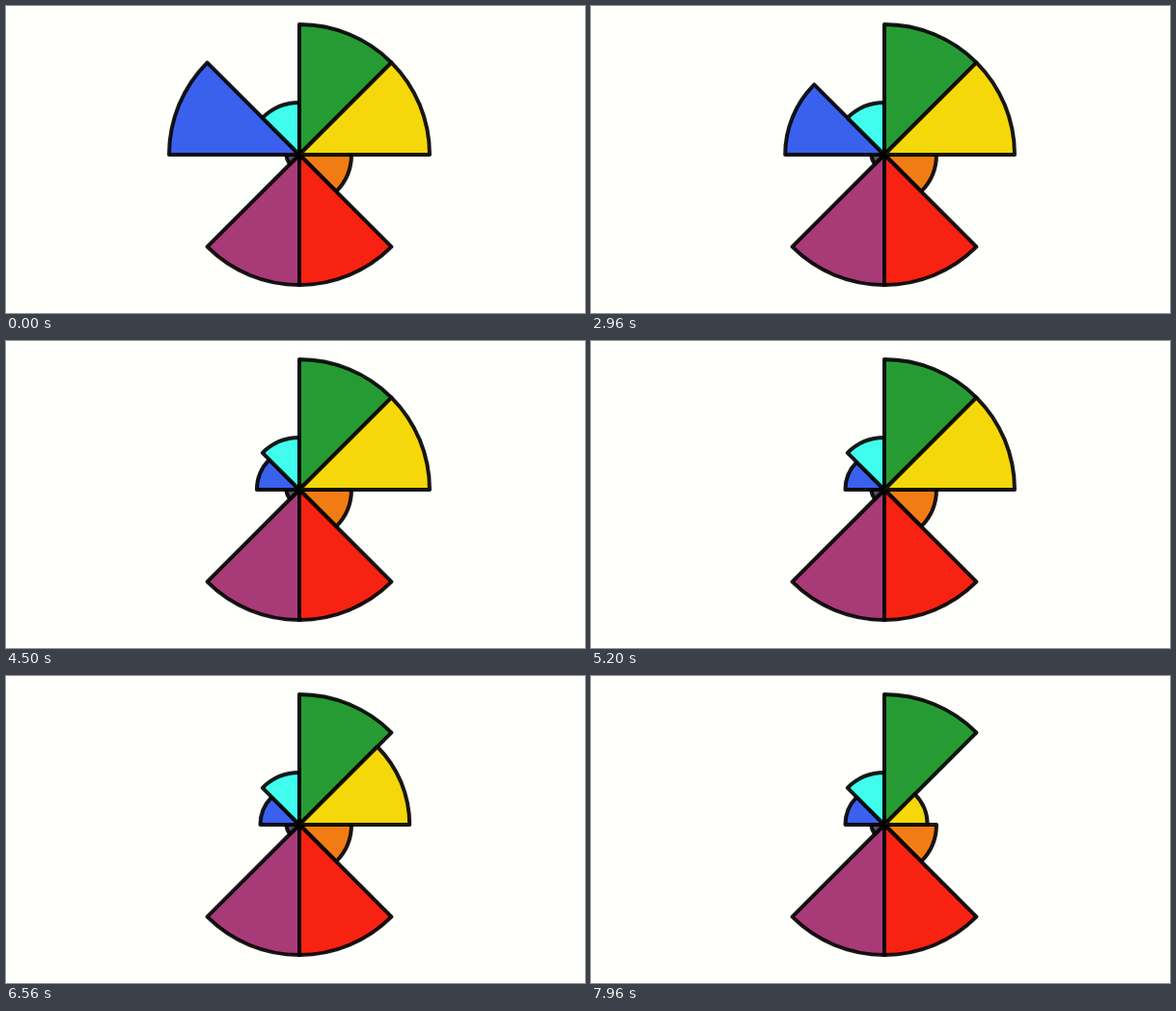
An HTML page with a canvas for the animation above (8 s loop, 600 px wide and 318 px high).

```html
<!DOCTYPE html>
<html lang="en">
<head>
<meta charset="utf-8">
<title>Wheel</title>
<style>
  html, body { margin: 0; width: 100%; height: 100%; overflow: hidden; background: #fffffc; }
  canvas { display: block; }
</style>
</head>
<body>
<canvas id="stage" width="600" height="318"></canvas>
<script>
const ctx = document.getElementById("stage").getContext("2d");
const LOOP = 8000;
const CX = 304, CY = 154, FULL = 135;

// Clockwise from three o'clock, one eighth of a turn each.
// Size is a share of the full radius; shrinking wedges start full.
const wedges = [
  { color: "#f27c14", size: 0.4 },
  { color: "#f82212", size: 1 },
  { color: "#a83a78", size: 1 },
  { color: "#5c5060", size: 0.1 },
  { color: "#3a60ee", size: 0.3, start: 2160, duration: 3300 },
  { color: "#40fdee", size: 0.4 },
  { color: "#269b34", size: 1 },
  { color: "#f4d80a", size: 0.3, start: 6080, duration: 2700 }
];

// Gentle start, long soft landing.
const ease = u => 1 - Math.pow(1 - Math.pow(u, 1.6), 3.8);

function radiusAt({ size, start, duration }, t) {
  if (!duration) return FULL * size;
  const u = Math.min(1, Math.max(0, (t - start) / duration));
  return FULL * (1 + (size - 1) * ease(u));
}

function drawWedge(index, radius, color) {
  const angle = index * Math.PI / 4;
  ctx.beginPath();
  ctx.moveTo(CX, CY);
  ctx.arc(CX, CY, radius, angle, angle + Math.PI / 4);
  ctx.closePath();
  ctx.fillStyle = color;
  ctx.fill();
  ctx.stroke();
}

function draw(t) {
  ctx.fillStyle = "#fffffc";
  ctx.fillRect(0, 0, 600, 318);
  ctx.lineWidth = 4;
  ctx.lineJoin = "round";
  ctx.strokeStyle = "rgba(0, 0, 0, 0.9)";
  wedges.forEach((wedge, i) => drawWedge(i, radiusAt(wedge, t), wedge.color));
}

const begin = performance.now();
function tick() {
  draw((performance.now() - begin) % LOOP);
  requestAnimationFrame(tick);
}
tick();
</script>
</body>
</html>
```
